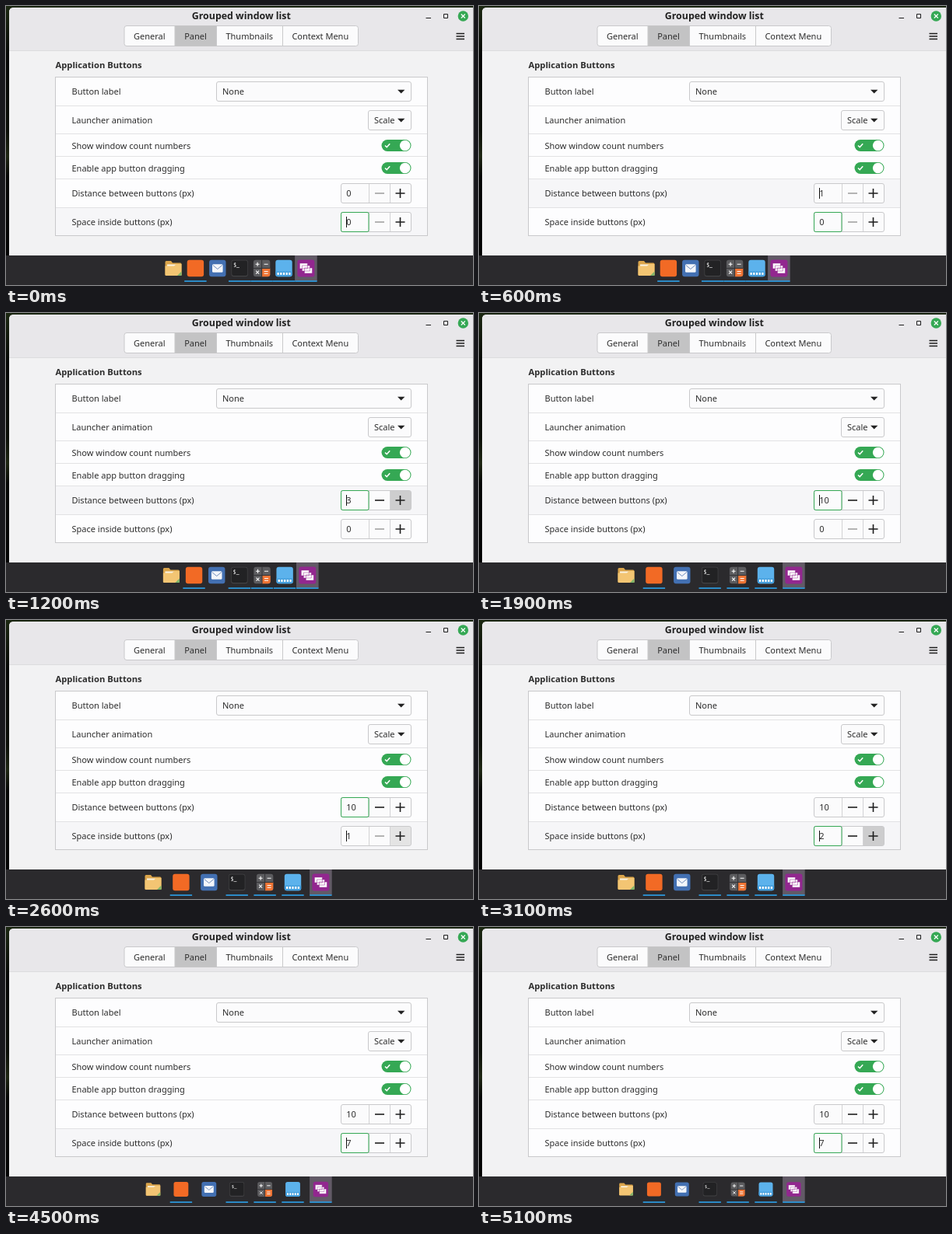
An HTML page that plays this animation: 600 by 359 pixels, repeating every 5500 ms.

```html
<!DOCTYPE html>
<html lang="en">
<head>
<meta charset="utf-8">
<title>Panel settings</title>
<style>
  html, body { margin: 0; width: 100%; height: 100%; overflow: hidden; background: #2b2a2d; }
  svg { display: block; width: 600px; height: 359px; }
  text { font: 11px "Noto Sans", sans-serif; fill: #2d2d2d; white-space: pre; }
  .bold { font-weight: 700; }
  .box { fill: #fbfbfc; stroke: #c9c9cb; }
  .rule { stroke: #e2e2e4; }
  .ink { stroke: #1d1d1d; fill: none; }
</style>
</head>
<body>
<svg id="stage" viewBox="0 0 600 359">
  <defs>
    <linearGradient id="wallpaper" x2="0" y2="1">
      <stop offset="0" stop-color="#1c2812"/><stop offset=".2" stop-color="#050604"/>
      <stop offset=".5" stop-color="#0b0e07"/><stop offset=".6" stop-color="#1e2612"/>
      <stop offset=".68" stop-color="#050604"/><stop offset="1" stop-color="#020202"/>
    </linearGradient>
  </defs>
  <rect width="600" height="322" fill="url(#wallpaper)"/>
  <path d="M4 322V8Q4 2 10 2H600V322Z" fill="#f2f2f3"/>
  <path d="M4 57V8Q4 2 10 2H600V57Z" fill="#e8e7ea"/>
  <path d="M4 57.500H600" stroke="#dcdcde"/>
  <text class="bold" x="302.300" y="17.400" text-anchor="middle" style="font-size:12.400px;fill:#222">Grouped window list</text>
  <path class="ink" d="M539.500 15.500H546M562.500 10.500h5v5h-5z"/>
  <circle cx="587.300" cy="13" r="6.700" fill="#35a854"/>
  <path d="M584.800 10.500l5 5m0-5l-5 5" stroke="#fff" stroke-width="1.200"/>
  <path class="ink" d="M578.500 35.500h10.500m-10.500 3.500h10.500m-10.500 3.500h10.500" stroke-width="1.500"/>
  <g id="tabs"></g>
  <text class="bold" x="63.500" y="80" style="font-size:11.200px">Application Buttons</text>
  <rect class="box" x="63.500" y="91.500" width="478" height="204" style="fill:#fdfdfe"/>
  <g id="rows"></g>
  <rect y="321" width="600" height="38" fill="#2b2a2d"/>
  <g id="panel"></g>
</svg>
<script>
const LOOP = 5500, TICK = 100;
const $ = id => document.getElementById(id);
const svgNS = "http://www.w3.org/2000/svg";

function group(parent, markup) {
  const g = document.createElementNS(svgNS, "g");
  g.innerHTML = markup;
  return parent.appendChild(g);
}

// Tabs
const tabEdges = [152, 217, 270.5, 355.5, 452.5];
$("tabs").innerHTML =
  `<rect class="box" x="152" y="25.500" width="300.5" height="26" rx="3"/>` +
  ["General", "Panel", "Thumbnails", "Context Menu"].map((name, i) => {
    const left = tabEdges[i], width = tabEdges[i + 1] - left;
    return (name === "Panel" ? `<rect x="${left}" y="25.500" width="${width}" height="26" fill="#c3c3c4"/>` : "") +
      (i ? `<path d="M${left} 26V51" stroke="#c9c9cb"/>` : "") +
      `<text x="${left + width / 2 - .2}" y="43" text-anchor="middle">${name}</text>`;
  }).join("");

// Setting rows
const rowEdges = [92, 128, 164, 193, 222, 259, 295];
const labels = ["Button label", "Launcher animation", "Show window count numbers",
  "Enable app button dragging", "Distance between buttons (px)", "Space inside buttons (px)"];

const combo = (x, y, text) => `
  <rect class="box" x="${x}" y="${y - 12.5}" width="${520.5 - x}" height="25" rx="2.500"/>
  <text x="${x + 7.5}" y="${y + 4}">${text}</text>
  <path d="M503 ${y - 2.3}h9.400l-4.700 4.800z" fill="#222"/>`;

const toggle = y => `
  <rect x="482.5" y="${y - 7.5}" width="38" height="15" rx="7.500" fill="#35a854"/>
  <circle cx="512.700" cy="${y}" r="6.800" fill="#fff"/>
  <path d="M487 ${y}l2.200 2.200 4-4.400" fill="none" stroke="#fff" stroke-width="1.600"/>`;

const spinner = y => `
  <rect class="box" x="430.5" y="${y - 12.5}" width="90" height="25" rx="2.500"/>
  <rect class="plus" x="494" y="${y - 12}" width="26" height="24" fill="#cdcdce"/>
  <path d="M466.500 ${y - 12}v24m27-24v24" stroke="#d2d2d4"/>
  <rect class="focus" x="430.500" y="${y - 12.5}" width="35.500" height="25" rx="2" fill="none" stroke="#35a854"/>
  <path class="minus ink" d="M474 ${y}h12" stroke-width="1.600"/>
  <path class="ink" d="M500.500 ${y}h12m-6-6v12" stroke-width="1.600"/>
  <text class="value" x="437.200" y="${y + 4}"></text>
  <path class="caret" d="M437.500 ${y - 7}v14" stroke="#111"/>`;

const controls = [y => combo(270.5, y, "None"), y => combo(465.5, y, "Scale"),
  toggle, toggle, spinner, spinner];

const rows = labels.map((label, i) => {
  const top = rowEdges[i], height = rowEdges[i + 1] - top;
  const middle = [110, 147, 179.5, 208.5, 241, 278][i];
  const row = group($("rows"), `
    <rect class="hover" x="64" y="${top}" width="477" height="${height}" fill="#f6f6f8" opacity="0"/>
    ${i ? `<path class="rule" d="M64 ${top + .5}H541"/>` : ""}
    <text x="84.500" y="${middle + 4}">${label}</text>${controls[i](middle)}`);
  return name => row.querySelector("." + name);
});
const [distanceRow, spaceRow] = rows.slice(4);

// Panel icons, each drawn around its own centre
const tile = (fill, r = 10.7) =>
  `<rect x="${-r}" y="${-r}" width="${2 * r}" height="${2 * r}" rx="3" fill="${fill}"/>`;
const icons = [
  `<path d="M-10.500-8q0-1.500 1.500-1.500h6l2 2.500h10q1.500 0 1.500 1.500V9h-21z" fill="#dba54b"/>
   <path d="M-8-5H8V3H-8z" fill="#faf3e2"/>
   <path d="M-10.500-3H1l3-2.500h6.500V8q0 1.500-1.500 1.500H-9q-1.500 0-1.500-1.500z" fill="#f3c573"/>
   <path d="M10.500 4V9.500H5z" fill="#7fb56a"/>`,
  tile("#f26a25"),
  tile("#4370b2") +
  `<rect x="-6.800" y="-5.200" width="13.600" height="10.400" rx="1.500" fill="#f4f6fa"/>
   <path d="M-6-4L0 1 6-4" fill="none" stroke="#6f8dbd"/>`,
  tile("#424244") +
  `<rect x="-10" y="-10" width="20" height="19.500" rx="2.500" fill="#222224"/>
   <text x="-8" y="-2" style="font:6.500px 'Noto Sans Mono',monospace;fill:#fff">$_</text>`,
  tile("#5c5c5f") +
  `<path d="M0 0H10.700V7.700q0 3-3 3H0z" fill="#ef7434"/>
   <path d="M-10.700 0h21.400M0-10.700v21.400" stroke="#333336"/>
   <path d="M-8-5.300h5m-2.500-2.500v5M3-5.300h5M-7.500 3.200l4 4m0-4l-4 4M3 4h5M3 6.800h5" stroke="#fff" stroke-width="1.100"/>`,
  tile("#5cb2ec") +
  `<path d="M-10.700 4H10.700V7.700q0 3-3 3H-7.700q-3 0-3-3z" fill="#459fdd"/>
   <path d="M-8.500 7H8.500" stroke="#fff" stroke-width="3" stroke-dasharray="2.200 1.500"/>`,
  tile("#92278f", 11) +
  `<path d="M-8-6.500H2V.5H-8zM-5-3.500H5V3.500H-5zM-2-.5H8V6.500H-2z" fill="#fff" stroke="#92278f" stroke-width=".5"/>`
];
const launchers = icons.map((icon, i) => {
  const running = i === 1 || i > 2, active = i === 6;
  const button = group($("panel"),
    (active ? `<rect x="-14.300" y="-17" width="28.600" height="33" fill="#625a66"/>` : "") +
    (running ? `<rect x="-14.200" y="15.200" width="28.400" height="1.800" fill="#2c95d6"/>` : ""));
  return { button, icon: group(button, icon) };
});

// Keyframes are [time, value]
const held = (t, keys) => keys.reduce((value, [time, next]) => t >= time ? next : value, keys[0][1]);
function ramp(t, keys) {
  const i = keys.findIndex(([time]) => time > t);
  if (i < 0) return keys[keys.length - 1][1];
  if (i === 0) return keys[0][1];
  const [t0, a] = keys[i - 1], [t1, b] = keys[i];
  return a + (b - a) * (t - t0) / (t1 - t0);
}

function updateSpinner(part, s) {
  part("hover").setAttribute("opacity", s.hover);
  part("plus").setAttribute("opacity", s.press);
  part("focus").setAttribute("opacity", s.focus);
  part("minus").setAttribute("opacity", .4 + .6 * s.enabled);
  part("caret").setAttribute("opacity", s.caret ? 1 : 0);
  part("value").textContent = s.value;
}

function draw(t) {
  const caretInSpace = t < 500 || t >= 2600;
  const caretShown = !(t >= 1800 && t < 1900) && !(t >= 4800 && t < 5100);
  const toDistance = ramp(t, [[600, 0], [800, 1], [2600, 1], [2800, 0]]);

  updateSpinner(distanceRow, {
    value: t < 1200 ? held(t, [[0, 0], [500, 1]]) : Math.min(10, 3 + Math.round((t - 1200) / 70)),
    hover: ramp(t, [[0, 0], [200, 1], [2000, 1], [2200, 0]]),
    press: ramp(t, [[600, 0], [800, 1], [1600, 1], [1800, 0]]),
    enabled: ramp(t, [[600, 0], [800, 1]]),
    focus: toDistance,
    caret: caretShown && !caretInSpace
  });
  updateSpinner(spaceRow, {
    value: held(t, [[0, 0], [2600, 1], [3100, 2], [3300, 3], [3500, 4], [3700, 5], [3900, 6], [4200, 7]]),
    hover: ramp(t, [[0, 1], [200, 0], [2000, 0], [2200, 1], [4700, 1], [4900, 0]]),
    press: ramp(t, [[2500, 0], [2700, 1], [2800, 1], [2900, .4], [3000, .4], [3100, 1],
      [3200, .7], [3300, 1], [3400, .7], [3500, 1], [4300, 1], [4500, 0]]),
    enabled: ramp(t, [[2600, 0], [2800, 1]]),
    focus: 1 - toDistance,
    caret: caretShown && caretInSpace
  });

  // The panel follows the entered values with a short delay
  const gap = ramp(t, [[600, 0], [900, 1], [1200, 1], [1900, 10]]);
  const scale = ramp(t, [[4200, 1], [4600, .84]]);
  launchers.forEach(({ button, icon }, i) => {
    const x = 300.2 - .35 * gap + (i - 3) * (28.4 + .75 * gap);
    button.setAttribute("transform", `translate(${x} 338)`);
    icon.setAttribute("transform", `translate(0 -.5) scale(${scale})`);
  });
}

const start = performance.now();
function frame() {
  const t = (performance.now() - start) % LOOP;
  draw(Math.floor(t / TICK) * TICK);
  requestAnimationFrame(frame);
}
frame();
</script>
</body>
</html>
```
